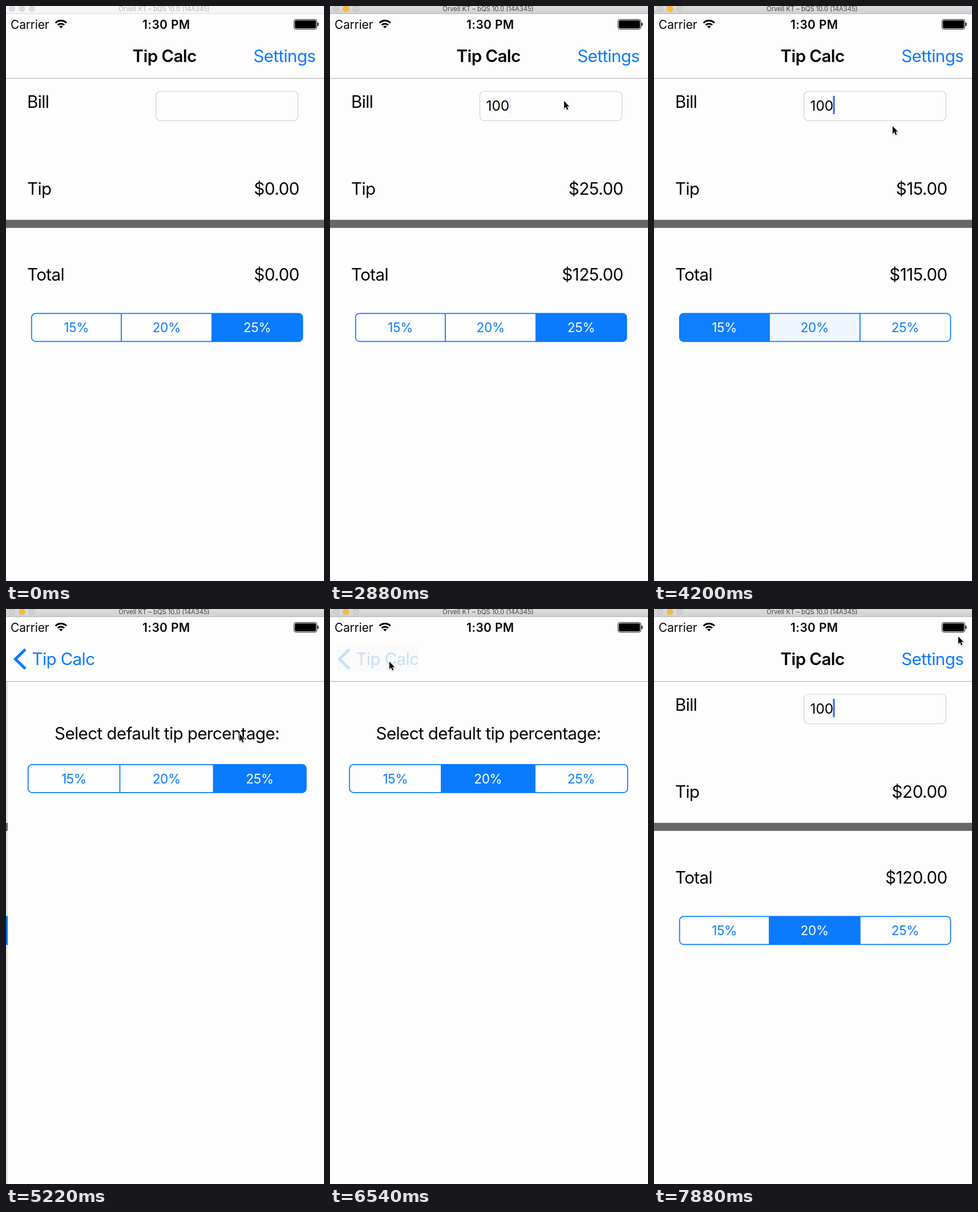
Animation of 557x1005 px, one loop 8000 ms. Source, as an HTML page with a canvas:

```html
<!DOCTYPE html>
<html lang="en">
<head>
<meta charset="utf-8">
<title>Tip Calc</title>
<style>
  html, body { margin: 0; width: 100%; height: 100%; overflow: hidden; background: #fdfdfd; }
  canvas { display: block; width: 557px; height: 1005px; }
</style>
</head>
<body>
<canvas id="stage" width="557" height="1005"></canvas>
<script>
const ctx = document.getElementById('stage').getContext('2d');
const W = 557, H = 1005, LOOP = 8000;
const BLUE = '#0a7aff', PAPER = '#fdfdfd', INK = '#050505';
const RATES = [15, 20, 25];

// Interaction starts at START and advances in steps of TICK ms.
const START = 2880, TICK = 146.1;
const POINTER = [
  [0, 410, 166], [1, 376, 270], [2, 308, 470], [3, 283, 556], [4, 280, 560],
  [5, 205, 564], [6, 126, 563], [7, 123, 562], [8, 142, 545], [9, 418, 210],
  [11, 492, 80], [12, 500, 82], [14, 499, 84], [15, 470, 130], [16, 409, 218],
  [18, 300, 292], [19, 281, 296], [21, 279, 297], [23, 196, 220], [24, 122, 110],
  [25, 104, 92], [26, 130, 106], [27, 332, 215], [29, 378, 236], [31, 402, 234],
  [32, 440, 190], [33, 508, 90], [34, 533, 48]
];
const BILL_PICKS = [[-99, 2], [4, 1], [8, 0], [18, 1]];
const DEFAULT_PICKS = [[-99, 2], [21, 1]];

function text(s, x, y, size, color = INK, align = 'left', weight = 400, track = 0) {
  ctx.font = `${weight} ${size}px Inter, Roboto, sans-serif`;
  ctx.letterSpacing = track * size + 'px';
  ctx.textAlign = align;
  ctx.fillStyle = color;
  ctx.fillText(s, x, y);
  ctx.letterSpacing = '0px';
}

const body = (s, x, y, color, align, weight) =>
  text(s, x, y, 29.6, color, align, weight, -0.021);

const money = (n, y) =>
  text('$' + n.toFixed(2), 513.8, y, 29.6, INK, 'right', 400, -0.016);

function box(x, y, w, h, color) {
  ctx.fillStyle = color;
  ctx.fillRect(x, y, w, h);
}

function rounded(x, y, w, h, r) {
  ctx.beginPath();
  ctx.roundRect(x, y, w, h, r);
}

function faded(alpha, paint) {
  ctx.save();
  ctx.globalAlpha *= alpha;
  paint();
  ctx.restore();
}

// Fill strength of each segment; the previous choice fades out quickly.
function segmentFill(picks, tick) {
  const fill = [0, 0, 0];
  let k = picks.length - 1;
  while (picks[k][0] > tick) k--;
  const age = tick - picks[k][0];
  const rest = age === 0 ? 0.3 : age === 1 ? 0.06 : 0;
  if (k > 0) fill[picks[k - 1][1]] = rest;
  fill[picks[k][1]] = 1 - rest / 2;
  return { fill, pick: picks[k][1] };
}

// edges: left side, two dividers, right side
function segments(edges, y, fill) {
  const h = 49, x = edges[0], w = edges[3] - x;
  ctx.save();
  rounded(x, y, w, h, 7);
  ctx.clip();
  fill.forEach((a, k) =>
    faded(a, () => box(edges[k], y, edges[k + 1] - edges[k], h, BLUE)));
  ctx.restore();
  ctx.strokeStyle = BLUE;
  ctx.lineWidth = 1.75;
  rounded(x, y, w, h, 7);
  ctx.stroke();
  for (let k = 1; k < 3; k++) box(edges[k] - 0.9, y, 1.8, h, BLUE);
  fill.forEach((a, k) =>
    text(RATES[k] + '%', (edges[k] + edges[k + 1]) / 2 - 0.2, y + 32.8, 22.6,
      a > 0.5 ? '#fff' : BLUE, 'center', 400, -0.015));
}

function billPage(tick, filled, caret) {
  const { fill, pick } = segmentFill(BILL_PICKS, tick);
  const bill = filled ? 100 : 0;
  const tip = bill * RATES[pick] / 100;
  body('Bill', 37, 178);
  body('Tip', 37, 330);
  body('Total', 37, 480);
  money(tip, 330);
  money(bill + tip, 480);
  ctx.strokeStyle = '#cbcbcb';
  ctx.lineWidth = 1.1;
  rounded(262.5, 149, 249, 51.5, 8);
  ctx.stroke();
  if (filled) {
    text('100', 273.5, 183, 24.4);
    faded(caret, () => box(313.5, 157, 3.2, 32, '#4169e8'));
  }
  box(-10, 373.7, W + 200, 14.1, '#676767');
  segments([44.8, 202, 360.8, 519.5], 537.3, fill);
}

function settingsPage(tick) {
  body('Select default tip percentage:', 277.5, 228.3, INK, 'center');
  segments([34.2, 195, 359, 521.3], 271.8, segmentFill(DEFAULT_PICKS, tick).fill);
}

function chevron() {
  ctx.strokeStyle = BLUE;
  ctx.lineWidth = 5;
  ctx.beginPath();
  ctx.moveTo(34, 70.5);
  ctx.lineTo(16.5, 87.5);
  ctx.lineTo(34, 104.5);
  ctx.stroke();
}

function navBar(tick) {
  const title = x => body('Tip Calc', x, 98, INK, 'center', 600);
  const settings = () => body('Settings', 542.2, 98, BLUE, 'right');
  if (tick === 27) {
    faded(0.05, chevron);
    faded(0.15, () => title(251));
    faded(0.13, settings);
  } else if (tick >= 16 && tick < 27) {
    const pressed = tick === 25 || tick === 26;
    if (pressed) box(12, 65, 142, 45, '#fafafa');
    faded(pressed ? 0.22 : 1, () => {
      chevron();
      body('Tip Calc', 45.4, 98, BLUE);
    });
  } else {
    title(277.6);
    faded(tick === 14 || tick === 15 ? 0.22 : 1, settings);
  }
  box(0, 126, W, 1.1, '#b0b0b0');
}

function windowBar(active) {
  const g = ctx.createLinearGradient(0, 0, 0, 13);
  g.addColorStop(0, active ? '#dedede' : '#f7f7f7');
  g.addColorStop(1, active ? '#d0d0d0' : '#f5f5f5');
  box(0, 0, W, 13, g);
  box(0, 13, W, 1, active ? '#b4b4b4' : '#dadada');
  [10.5, 28, 45.5].forEach((x, k) => {
    const lit = active && k === 1;
    ctx.beginPath();
    ctx.arc(x, 4.6, 5, 0, 7);
    ctx.fillStyle = lit ? '#fdbd2f' : active ? '#d0d0d0' : '#dcdcdc';
    ctx.fill();
    ctx.lineWidth = 0.8;
    ctx.strokeStyle = lit ? '#dfa023' : active ? '#b9b9b9' : '#d0d0d0';
    ctx.stroke();
  });
  text('Orvell KT – bQS 10.0 (14A345)', 277, 9, 11.2, active ? '#454545' : '#b5b5b5', 'center');
}

function statusBar() {
  text('Carrier', 8, 39.6, 20.9, INK, 'left', 400, -0.006);
  text('1:30 PM', 280.8, 39.6, 20.9, INK, 'center', 600, 0.02);
  ctx.fillStyle = '#000';
  [[0, 4.6], [6.6, 9.6], [12, 15]].forEach(([inner, outer]) => {
    ctx.beginPath();
    ctx.arc(96.3, 39, outer, -Math.PI * 0.75, -Math.PI * 0.25);
    ctx.arc(96.3, 39, inner, -Math.PI * 0.25, -Math.PI * 0.75, true);
    ctx.fill();
  });
  ctx.strokeStyle = '#111';
  ctx.lineWidth = 1;
  rounded(504.5, 23.5, 40, 17, 3.2);
  ctx.stroke();
  rounded(506, 25, 37, 14, 2);
  ctx.fill();
  rounded(545.6, 29, 2, 6, [0, 2, 2, 0]);
  ctx.fill();
}

function arrow([x, y]) {
  ctx.save();
  ctx.translate(x, y);
  ctx.beginPath();
  [[0, 0], [0, 13], [3, 10.3], [5.2, 15.2], [7.3, 14.2], [5.1, 9.6], [9.2, 9.6]]
    .forEach(p => ctx.lineTo(...p));
  ctx.closePath();
  ctx.shadowColor = 'rgba(0,0,0,.3)';
  ctx.shadowBlur = 2;
  ctx.shadowOffsetY = 1;
  ctx.strokeStyle = '#fff';
  ctx.lineWidth = 1.8;
  ctx.lineJoin = 'round';
  ctx.stroke();
  ctx.shadowColor = 'transparent';
  ctx.fillStyle = '#000';
  ctx.fill();
  ctx.restore();
}

function pointerAt(t, tick) {
  if (t < 500) return null;
  if (t < 1840) {
    const u = Math.min(5, Math.floor((t - 500) / 150)) / 5;
    const e = u * u * (3 - 2 * u);
    return [528 - 64 * e, 924 - 204 * e];
  }
  if (tick <= 0) return [410, 166];
  const k = POINTER.findIndex(p => p[0] >= tick);
  if (k < 0) return POINTER[POINTER.length - 1].slice(1);
  const [a, ax, ay] = POINTER[k - 1], [b, bx, by] = POINTER[k];
  const u = (tick - a) / (b - a);
  return [ax + (bx - ax) * u, ay + (by - ay) * u];
}

function caretAt(t, tick) {
  if (t < 2440) return 1;
  if (t < 2580) return 0.5;
  if (t < START) return 0;
  const phase = (tick < 27 ? tick : tick - 25) % 7;
  return [0.1, 1, 1, 1, 0.5, 0, 0][phase];
}

// 0 shows the bill page, 1 the settings page.
function slideAt(tick) {
  if (tick === 16) return 0.992;
  if (tick === 27) return 0.132;
  return tick > 16 && tick < 27 ? 1 : 0;
}

function draw(t) {
  const tick = Math.floor((t - START) / TICK);
  const active = t >= 1840;
  const p = slideAt(tick);
  const shift = W * (1 - p), edge = p === 1 ? 0 : p ? shift - 1.5 : W;
  box(0, 0, W, H, PAPER);
  if (p < 1) {
    ctx.save();
    ctx.beginPath();
    ctx.rect(0, 127, edge, H);
    ctx.clip();
    ctx.translate(-167 * p, 0);
    billPage(tick, active, caretAt(t, tick));
    ctx.restore();
    faded(0.1 * p, () => box(0, 127, edge, H, '#000'));
  }
  if (p > 0) {
    if (p < 1) box(edge - 2, 127, 2, H, 'rgba(0,0,0,.025)');
    ctx.save();
    ctx.translate(shift, 0);
    settingsPage(tick);
    ctx.restore();
  }
  navBar(tick);
  windowBar(active);
  statusBar();
  const pos = pointerAt(t, tick);
  if (pos) arrow(pos);
}

const begin = performance.now();
function loop() {
  draw((performance.now() - begin) % LOOP);
  requestAnimationFrame(loop);
}
loop();
</script>
</body>
</html>
```
